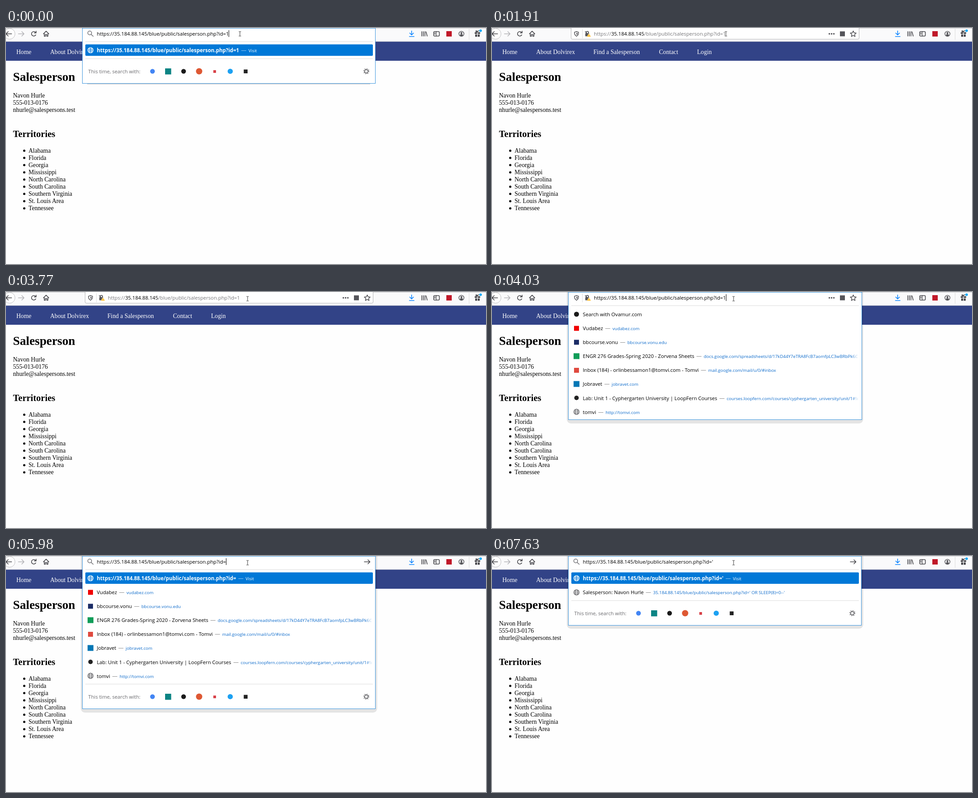
Recreate the animation shown at these times as an HTML page. Size 1065 by 526 pixels, loop 8 s.

```html
<!DOCTYPE html>
<html lang="en">
<head>
<meta charset="utf-8">
<title>Salesperson page</title>
<style>
html, body { margin: 0; width: 100%; height: 100%; overflow: hidden; background: #fefefe; }
svg { display: block; width: 1065px; height: 526px; }
.page { font: 13.65px "Liberation Serif", serif; }
.ui { font: 11.26px "Open Sans", sans-serif; }
.row { font-size: 11.2px; }
.bold { font-weight: 700; font-size: 11.48px; fill: #fff; }
.dash { font-size: 12px; font-weight: 400; fill: #8c8c8c; }
.link { font-size: 9.7px; font-weight: 400; fill: #0f6ccb; }
.bold .dash { fill: #9cc9f1; }
.bold .link { fill: #fff; }
.dim { fill: #77777a; }
.line { fill: none; stroke: #45454a; stroke-width: 1.6; stroke-linecap: round; stroke-linejoin: round; }
.thin { stroke-width: 1.4; }
.rule { stroke: #dcdcdc; }

/* timed parts: hidden unless their keyframes say otherwise */
.t { visibility: hidden; animation: 8s step-end infinite; }
.first { animation-name: first; }
.closed { animation-name: closed; }
.waiting { animation-name: waiting; }
.loaded { animation-name: loaded; }
.plain { animation-name: plain; }
.selected { animation-name: selected; }
.site { animation-name: site; }
.glass { animation-name: glass; }
.edit { animation-name: edit; }
.bare { animation-name: bare; }
.quoted { animation-name: quoted; }
.panel { animation-name: panel; }
.shadow { animation-name: shadow; }
.suggest { animation-name: suggest; }
.engine { animation-name: engine; }
.match { animation-name: match; }
.bar { animation-name: bar; }
.foot { animation-name: foot; }
.caret1 { animation-name: caret1; }
.caret2 { animation-name: caret2; }
.caret3 { animation-name: caret3; }
.caret4 { animation-name: caret4; }
.arc { animation-name: arc; }
.stop { animation-name: stop; }
.reload { animation-name: reload; }
.arrow { animation-name: arrow; }
.beam { animation-name: beam; }

@keyframes first { 0% { visibility: visible } 11.875% { visibility: hidden } }
@keyframes closed {
  0% { visibility: hidden }
  11.875% { visibility: visible; stroke: #b4b4b6 }
  25.625% { visibility: visible; stroke: #cacacc }
  42.375% { visibility: visible; stroke: #b4b4b6 }
  50.375% { visibility: hidden }
}
@keyframes waiting { 0% { visibility: hidden } 11.875% { visibility: visible } 15.25% { visibility: hidden } }
@keyframes loaded { 0% { visibility: hidden } 15.25% { visibility: visible } 50.375% { visibility: hidden } }
@keyframes plain {
  0%, 52.125%, 74.75% { visibility: hidden }
  50.375%, 66.25% { visibility: visible }
}
@keyframes selected { 0% { visibility: hidden } 52.125% { visibility: visible } 66.25% { visibility: hidden } }
@keyframes site { 0% { visibility: hidden } 15.25% { visibility: visible } 74.75% { visibility: hidden } }
@keyframes glass { 0%, 74.75%, 100% { visibility: visible } 15.25% { visibility: hidden } }
@keyframes edit { 0% { visibility: hidden } 74.75%, 100% { visibility: visible } }
@keyframes bare { 0% { visibility: hidden } 74.75% { visibility: visible } 88.5% { visibility: hidden } }
@keyframes quoted { 0% { visibility: hidden } 88.5%, 100% { visibility: visible } }
@keyframes panel {
  0% { visibility: visible; height: 123px; width: 650px }
  11.875% { visibility: hidden; height: 123px; width: 650px }
  50.375% { visibility: visible; height: 284px; width: 651px }
  74.75% { visibility: visible; height: 340px; width: 650px }
  78%, 100% { visibility: visible; height: 154px; width: 650px }
}
@keyframes shadow {
  0% { visibility: hidden; height: 303px }
  50.375% { visibility: visible; height: 303px }
  74.75% { visibility: visible; height: 359px }
  78%, 100% { visibility: visible; height: 172px }
}
@keyframes suggest { 0% { visibility: hidden } 50.375% { visibility: visible } 78% { visibility: hidden } }
@keyframes engine { 0% { visibility: hidden } 50.375% { visibility: visible } 74.75% { visibility: hidden } }
@keyframes match { 0% { visibility: hidden } 78%, 100% { visibility: visible } }
@keyframes bar { 0%, 74.75%, 100% { visibility: visible } 11.875% { visibility: hidden } }
@keyframes foot {
  0% { visibility: visible; transform: none }
  11.875% { visibility: hidden; transform: none }
  74.75% { visibility: visible; transform: translateY(217px) }
  78%, 100% { visibility: visible; transform: translateY(31px) }
}
@keyframes caret1 { 0%, 8.125% { visibility: visible } 2.75%, 11.875% { visibility: hidden } }
@keyframes caret2 {
  0%, 52.125%, 69.625% { visibility: hidden }
  50.375%, 66.25% { visibility: visible }
}
@keyframes caret3 { 0% { visibility: hidden } 74.75% { visibility: visible } 83% { visibility: hidden } }
@keyframes caret4 { 0% { visibility: hidden } 93.875% { visibility: visible } 95.375% { visibility: hidden } }
@keyframes arc {
  0%, 13.75%, 16.75% { visibility: hidden }
  11.875%, 15.25% { visibility: visible }
}
@keyframes stop { 0% { visibility: hidden } 13.75% { visibility: visible } 15.25% { visibility: hidden } }
@keyframes reload {
  0% { visibility: visible; opacity: 1 }
  11.875% { visibility: hidden; opacity: 1 }
  16.75% { visibility: visible; opacity: .4 }
  23.875%, 100% { visibility: visible; opacity: 1 }
}
@keyframes arrow {
  0% { visibility: hidden; transform: none }
  25.625% { visibility: visible; transform: translate(420px, 36px) }
  27.125% { visibility: visible; transform: translate(272px, 73px) }
  29% { visibility: visible; transform: translate(172px, 146px) }
  32.25% { visibility: visible; transform: translate(97px, 355px) }
  34.125% { visibility: visible; transform: translate(96px, 414px) }
  35.875% { visibility: visible; transform: translate(200px, 325px) }
  37.5% { visibility: visible; transform: translate(360px, 160px) }
  39% { visibility: visible; transform: translate(484px, 50px) }
  40.75% { visibility: visible; transform: translate(515px, 28px) }
  42.375% { visibility: hidden; transform: none }
}
@keyframes beam {
  0% { visibility: visible; transform: translate(519px, 13px) }
  25.625% { visibility: hidden; transform: none }
  42.375% { visibility: visible; transform: translate(535px, 16px) }
  43.875% { visibility: visible; transform: translate(537px, 18px) }
  45.625% { visibility: visible; transform: translate(537px, 17px) }
  47.125%, 100% { visibility: visible; transform: translate(536px, 15px) }
}
</style>
</head>
<body>
<svg viewBox="0 0 1065 526">
  <defs>
    <g id="globe" fill="none" stroke="currentColor" stroke-width="1.2">
      <circle r="6"/><ellipse rx="2.8" ry="6"/><path d="M-6 0H6M-5 -3H5M-5 3H5"/>
    </g>
    <linearGradient id="fade">
      <stop offset="0" stop-color="#fff" stop-opacity="0"/>
      <stop offset=".75" stop-color="#fff"/>
    </linearGradient>
  </defs>

  <!-- web page -->
  <g class="page">
    <rect y="30" width="1065" height="43" fill="#324387"/>
    <g fill="#fff">
      <text x="23" y="57.5">Home</text>
      <text x="98" y="57.5">About Dolvirex</text>
      <text x="225" y="57.5">Find a Salesperson</text>
      <text x="370.5" y="57.5">Contact</text>
      <text x="455" y="57.5">Login</text>
    </g>
    <text x="15.5" y="117.5" font-size="27.3" font-weight="700">Salesperson</text>
    <text x="15.5" y="154.5">Navon Hurle</text>
    <text x="15.5" y="170.5">555-013-0176</text>
    <text x="15.5" y="186.5">nhurle@salespersons.test</text>
    <text x="15.5" y="242.5" font-size="20.5" font-weight="700">Territories</text>
    <g id="list"></g>
  </g>

  <!-- toolbar -->
  <rect width="1065" height="30" fill="#fafafb"/>
  <path d="M0 .5H1065" stroke="#cfcfd1"/>
  <path d="M0 30H1065" stroke="#d8d8da"/>
  <circle cx="8" cy="13" r="12" fill="#fff" stroke="#bdbdc0"/>
  <g class="line">
    <path d="M12.5 13H0M5 8L0 13L5 18"/>
    <path d="M27.5 13H40M35 8L40 13L35 18" stroke="#b4b4b8"/>
    <path class="t reload" d="M66 15.3A5 5 0 1 1 65.5 9.8M66.8 7V11H62.8"/>
    <path class="t arc" d="M58.5 17.2A5 5 0 1 1 64 17.2"/>
    <path class="t stop" d="M57 8.5L66 17.5M66 8.5L57 17.5"/>
    <path d="M83 13L89 7L95 13M85 12.5V18.5H87.5V14.5H90.5V18.5H93V12.5"/>
    <path d="M900 6.5V15M895.8 11.3L900 15.5L904.2 11.3M895 19H905.5" stroke="#0a84ff"/>
    <path d="M922.5 8V18M926 8V18M929.5 8V18M932 8.5L934.5 18"/>
    <rect x="949" y="8" width="12.5" height="10" rx="2"/>
    <path d="M954.5 8V18M951 11H952.5M951 13.5H952.5" stroke-width="1.3"/>
    <circle cx="1010.5" cy="13" r="5.6" stroke-width="1.3"/>
  </g>
  <rect x="977" y="7" width="12" height="12" fill="#c01829"/>
  <g fill="#45454a">
    <circle cx="1010.5" cy="11.3" r="2.1"/>
    <path d="M1006.8 16A3.8 2.8 0 0 1 1014.2 16L1010.5 18Z"/>
    <path d="M1040 9.5H1045.3V13H1040ZM1046.7 9.5H1052V13H1046.7ZM1041 14.2H1045.3V19.5H1041ZM1046.7 14.2H1051V19.5H1046.7Z"/>
  </g>
  <path class="line" d="M1046 9Q1041 8 1043 6.3Q1045 6 1046 9Q1047 6 1049 6.3"/>
  <circle cx="1053" cy="6" r="2.8" fill="#00a7f5"/>
  <path class="rule" d="M1027.5 2V26"/>

  <!-- address field and drop-down -->
  <rect class="t closed" x="175.5" y="-6" width="639" height="31" rx="3" fill="#fff" stroke="#b4b4b6"/>
  <rect class="t first" x="180" y="124" width="628" height="1.6" fill="#cfcfd1"/>
  <rect class="t shadow" x="166" y="-10" width="657.5" height="303" rx="9" fill="#000" fill-opacity=".1"/>
  <rect class="t panel" x="169.5" y=".5" width="650" height="123" fill="#fff" stroke="#3c96de"/>
  <path class="t bar rule" d="M176 30.5H814"/>
  <path class="t engine rule" d="M176 30.5H814"/>

  <g class="ui">
    <g class="t bar">
      <rect x="176" y="36.5" width="638" height="25.5" rx="2" fill="#0078d7"/>
      <use href="#globe" x="187.5" y="49.5" color="#fff"/>
    </g>
    <text class="t first bold" x="201.5" y="54">https://35.184.88.145/blue/public/salesperson.php?id=1<tspan class="dash" dx="4.5">—</tspan><tspan class="link" dx="4.5">Visit</tspan></text>
    <text class="t bare bold" x="201.5" y="54">https://35.184.88.145/blue/public/salesperson.php?id=<tspan class="dash" dx="4.5">—</tspan><tspan class="link" dx="4.5">Visit</tspan></text>
    <text class="t quoted bold" x="201.5" y="54">https://35.184.88.145/blue/public/salesperson.php?id='<tspan class="dash" dx="4.5">—</tspan><tspan class="link" dx="4.5">Visit</tspan></text>

    <g class="t engine">
      <circle cx="187.5" cy="49.5" r="5.5" fill="#1a1a1a"/>
      <text class="row" x="201.5" y="54">Search with Ovamur.com</text>
    </g>
    <g class="t suggest">
      <rect x="182" y="75.5" width="11" height="11" fill="#f00000"/>
      <rect x="182" y="106.5" width="11" height="11" fill="#1b2c66"/>
      <rect x="181" y="136.5" width="13" height="13" fill="#0f9d58"/>
      <rect x="182" y="169" width="11" height="11" fill="#e04a3f"/>
      <rect x="181" y="198.5" width="13" height="13" fill="#0077b5"/>
      <circle cx="187.5" cy="236" r="5" fill="#222"/>
      <use href="#globe" x="187.5" y="267" color="#66666a"/>
      <g id="rows"></g>
      <rect x="797" y="70" width="22" height="205" fill="url(#fade)"/>
    </g>
    <g class="t match">
      <use href="#globe" x="187.5" y="81" color="#66666a"/>
      <text class="row" x="201.5" y="85">Salesperson: Navon Hurle<tspan class="dash" dx="4.5">—</tspan><tspan class="link" dx="4.5">35.184.88.145/blue/public/salesperson.php?id=' OR SLEEP(8)=0--'</tspan></text>
    </g>

    <g class="t foot">
      <path class="rule" d="M176 68.5H814"/>
      <text class="row" x="182.5" y="101" fill="#6a6a6e">This time, search with:</text>
      <circle cx="325" cy="96.5" r="5.2" fill="#4285f4"/>
      <rect x="353" y="90" width="13.5" height="13.5" fill="#0c8484"/>
      <circle cx="394" cy="96.5" r="5.2" fill="#1a1a1a"/>
      <circle cx="428.5" cy="96.5" r="7" fill="#de5833"/>
      <rect x="460" y="94" width="6" height="6" fill="#d8434a"/>
      <circle cx="497.5" cy="96.5" r="5.8" fill="#1da1f2"/>
      <rect x="527.5" y="92.5" width="8.5" height="8.5" fill="#222"/>
      <g fill="none" stroke="#5c5c60">
        <circle cx="799.5" cy="96.5" r="3.7" stroke-width="1.5"/>
        <circle cx="799.5" cy="96.5" r="5.5" stroke-width="2.2" stroke-dasharray="1.6 2.72"/>
      </g>
    </g>

    <!-- address text -->
    <text class="t first" x="201.5" y="17">https://35.184.88.145/blue/public/salesperson.php?id=1</text>
    <text class="t waiting dim" x="201.5" y="17">https://<tspan fill="#000">35.184.88.145</tspan>/blue/public/salesperson.php?id=1</text>
    <text class="t loaded dim" x="226" y="17">https://<tspan fill="#000">35.184.88.145</tspan>/blue/public/salesperson.php?id=1</text>
    <text class="t plain" x="226" y="17">https://35.184.88.145/blue/public/salesperson.php?id=1</text>
    <g class="t selected">
      <rect x="226" y="4" width="294" height="16" fill="#0078d7"/>
      <text x="226" y="17" fill="#fff">https://35.184.88.145/blue/public/salesperson.php?id=1</text>
    </g>
    <text class="t bare" x="201.5" y="17">https://35.184.88.145/blue/public/salesperson.php?id=</text>
    <text class="t quoted" x="201.5" y="17">https://35.184.88.145/blue/public/salesperson.php?id='</text>
  </g>
  <rect class="t caret1" x="494" y="5" width="1" height="15"/>
  <rect class="t caret2" x="519" y="5" width="1" height="15"/>
  <rect class="t caret3" x="488" y="5" width="1" height="15"/>
  <rect class="t caret4" x="494" y="5" width="1" height="15"/>

  <!-- address icons -->
  <g class="t glass line" style="stroke: #77777b">
    <circle cx="185.7" cy="11" r="4.2"/><path d="M189 14.3L193.5 18.5"/>
  </g>
  <path class="t edit line" d="M795 13H807.5M803 8.5L807.5 13L803 17.5"/>
  <g class="t site">
    <path class="line thin" d="M187.5 8L192 9.3Q192.5 15.5 187.5 18.5Q182.5 15.5 183 9.3Z"/>
    <path d="M187.5 10.5L190 11.2Q190 14.5 187.5 16Z" fill="#45454a"/>
    <path class="rule" d="M200.5 3V23"/>
    <path class="line" d="M208.8 12V10Q209 7.5 211.5 7.5Q214 7.5 214.2 10V12"/>
    <rect x="207" y="11.5" width="9" height="7" rx="1" fill="#55555a"/>
    <path d="M206.5 7.5L217 18.5" stroke="#55555a" stroke-width="1.5"/>
    <path d="M215 12L219.5 19.5H210.5Z" fill="#ffb000" stroke="#fff" stroke-width=".6"/>
    <path d="M215 14.5V18.5" stroke="#fff"/>
    <g fill="#55555a">
      <circle cx="748.5" cy="13" r="1.8"/><circle cx="753.5" cy="13" r="1.8"/><circle cx="758.5" cy="13" r="1.8"/>
      <rect x="772" y="7.5" width="11" height="11"/>
    </g>
    <path class="line thin" d="M801.5 6.5L803.4 10.8L808 11.3L804.5 14.4L805.6 19L801.5 16.6L797.4 19L798.5 14.4L795 11.3L799.6 10.8Z"/>
  </g>

  <!-- pointers -->
  <path class="t arrow" d="M.5 .5V9.3L2.6 7.5L4 10.6L5.3 10L4 7H6.7Z" fill="#fff" stroke="#444" stroke-width=".8"/>
  <path class="t beam" d="M-2.5 -5H-.6L0 -4.5L.6 -5H2.5M0 -4.5V4.5M-2.5 5H-.6L0 4.5L.6 5H2.5" fill="none" stroke="#333"/>
</svg>
<script>
const states = ["Alabama", "Florida", "Georgia", "Mississippi", "North Carolina",
  "South Carolina", "Southern Virginia", "St. Louis Area", "Tennessee"];
const sites = [
  ["Vudabez", "vudabez.com"],
  ["bbcourse.vonu", "bbcourse.vonu.edu"],
  ["ENGR 276 Grades-Spring 2020 - Zorvena Sheets",
    "docs.google.com/spreadsheets/d/17kD44Y7eTRA8FcB7aomfpLC3wBRbPk6C"],
  ["Inbox (184) - orlinbessamon1@tomvi.com - Tomvi", "mail.google.com/mail/u/0/#inbox"],
  ["Jobravet", "jobravet.com"],
  ["Lab: Unit 1 - Cyphergarten University | LoopFern Courses",
    "courses.loopfern.com/courses/cyphergarten_university/unit/1#!e"],
  ["tomvi", "http://tomvi.com"]
];

const fill = (id, items, draw) =>
  document.getElementById(id).innerHTML = items.map(draw).join("");

fill("list", states, (name, i) => {
  const y = 277.5 + i * 16.06;
  return `<circle cx="40.5" cy="${y - 4}" r="2.5"/><text x="50" y="${y}">${name}</text>`;
});
fill("rows", sites, ([title, link], i) =>
  `<text class="row" x="201.5" y="${85 + i * 31.1}">${title}` +
  `<tspan class="dash" dx="4.5">—</tspan><tspan class="link" dx="4.5">${link}</tspan></text>`);
</script>
</body>
</html>
```
